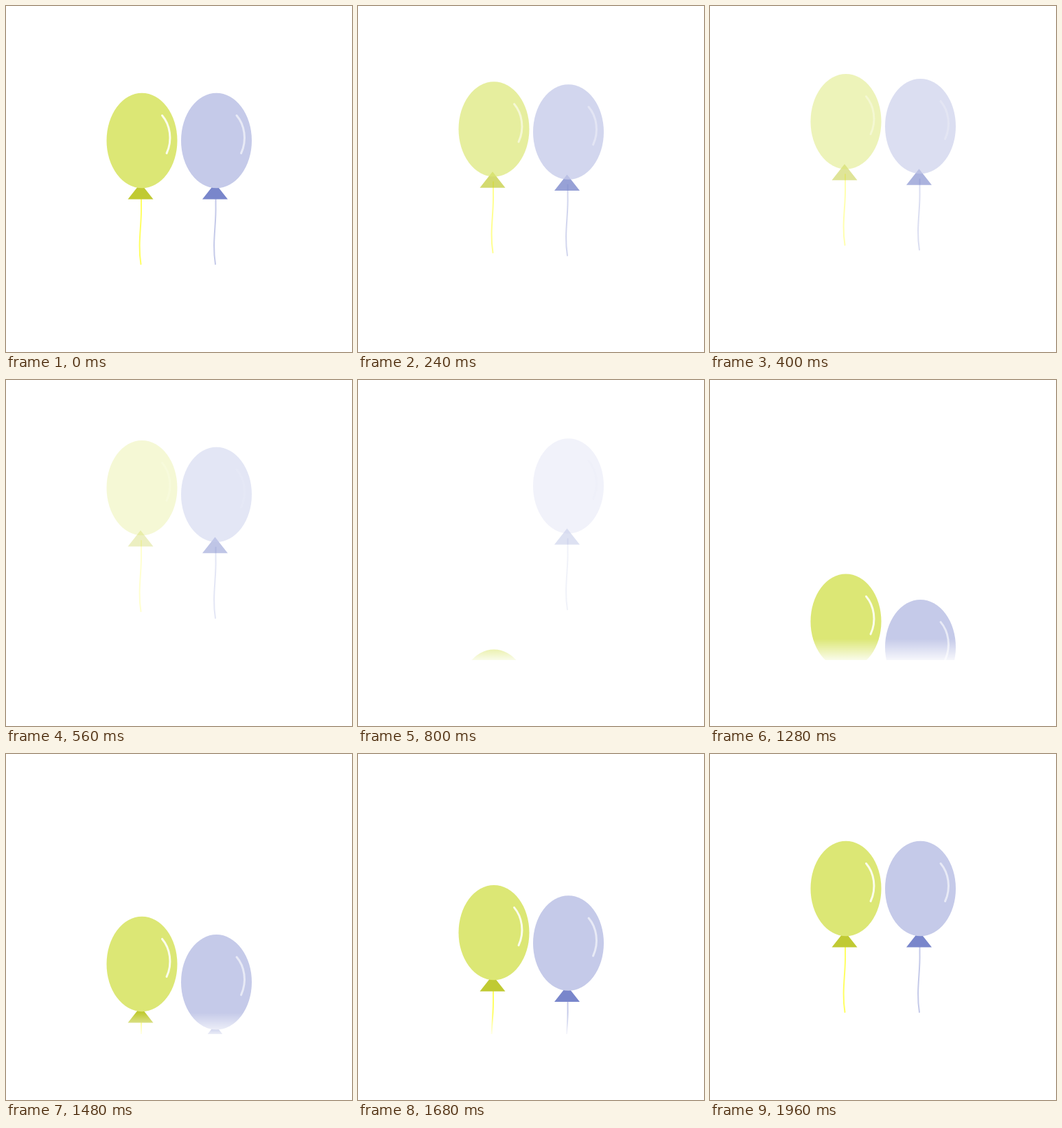
Recreate the animation shown at these times as an HTML page. Size 504 by 504 pixels, loop 2 s.

```html
<!DOCTYPE html>
<html lang="en">
<head>
<meta charset="utf-8">
<title>Balloons</title>
<style>
html, body { margin: 0; width: 100%; height: 100%; overflow: hidden; background: #fff; }
svg { display: block; width: 100vw; height: 100vh; }
#balloon > * { opacity: var(--alpha); }
.body { fill: var(--body); }
.knot { fill: var(--knot); }
.string, .shine { fill: none; stroke-linecap: round; }
.string { stroke: var(--string); stroke-width: 2; }
.shine { stroke: var(--shine); stroke-width: 3; }
#lime { --body: #dce775; --knot: #c0ca33; --string: #ffff62; --shine: #fbfdec; }
#blue { --body: #c5cae9; --knot: #7986cb; --string: #c5cae9; --shine: #e8eaf6; }
</style>
</head>
<body>
<svg viewBox="0 0 504 504">
  <defs>
    <linearGradient id="fade" gradientUnits="userSpaceOnUse" x1="0" y1="377" x2="0" y2="408">
      <stop offset="0" stop-color="#fff"/>
      <stop offset="1" stop-color="#fff" stop-opacity=".15"/>
    </linearGradient>
    <mask id="floor" maskUnits="userSpaceOnUse" x="0" y="0" width="504" height="504">
      <rect width="504" height="408" fill="url(#fade)"/>
    </mask>
    <g id="balloon">
      <path class="string" d="M197 273V290C198 318 191.500 345 196.500 376"/>
      <path class="knot" d="M196 258L214.500 281.500H177.500Z"/>
      <ellipse class="body" cx="198" cy="196" rx="51.500" ry="69.200"/>
      <path class="shine" d="M227.500 159.500C239 173 243 195 234 214.500"/>
    </g>
  </defs>
  <g mask="url(#floor)">
    <use id="lime" href="#balloon"/>
    <use id="blue" href="#balloon"/>
  </g>
</svg>
<script>
const LOOP = 2000, STEP = 40, LAND = LOOP - STEP;
const RISE = 50, DROP = 284;
const balloons = [
  { el: document.getElementById('lime'), x: 0, exit: 720 },
  { el: document.getElementById('blue'), x: 108.5, exit: 960 }
];

// Drift up while fading, then climb back in from below the floor.
function pose({ el, x, exit }, t) {
  const leaving = t < exit;
  const y = leaving ? -RISE * t / exit : DROP * (LAND - t) / (LAND - exit);
  el.setAttribute('transform', `translate(${x} ${y})`);
  el.style.setProperty('--alpha', leaving ? 1 - 0.9 * t / exit : 1);
}

function draw() {
  const t = Math.floor(performance.now() % LOOP / STEP) * STEP;
  balloons.forEach(b => pose(b, t));
  requestAnimationFrame(draw);
}
draw();
</script>
</body>
</html>
```
